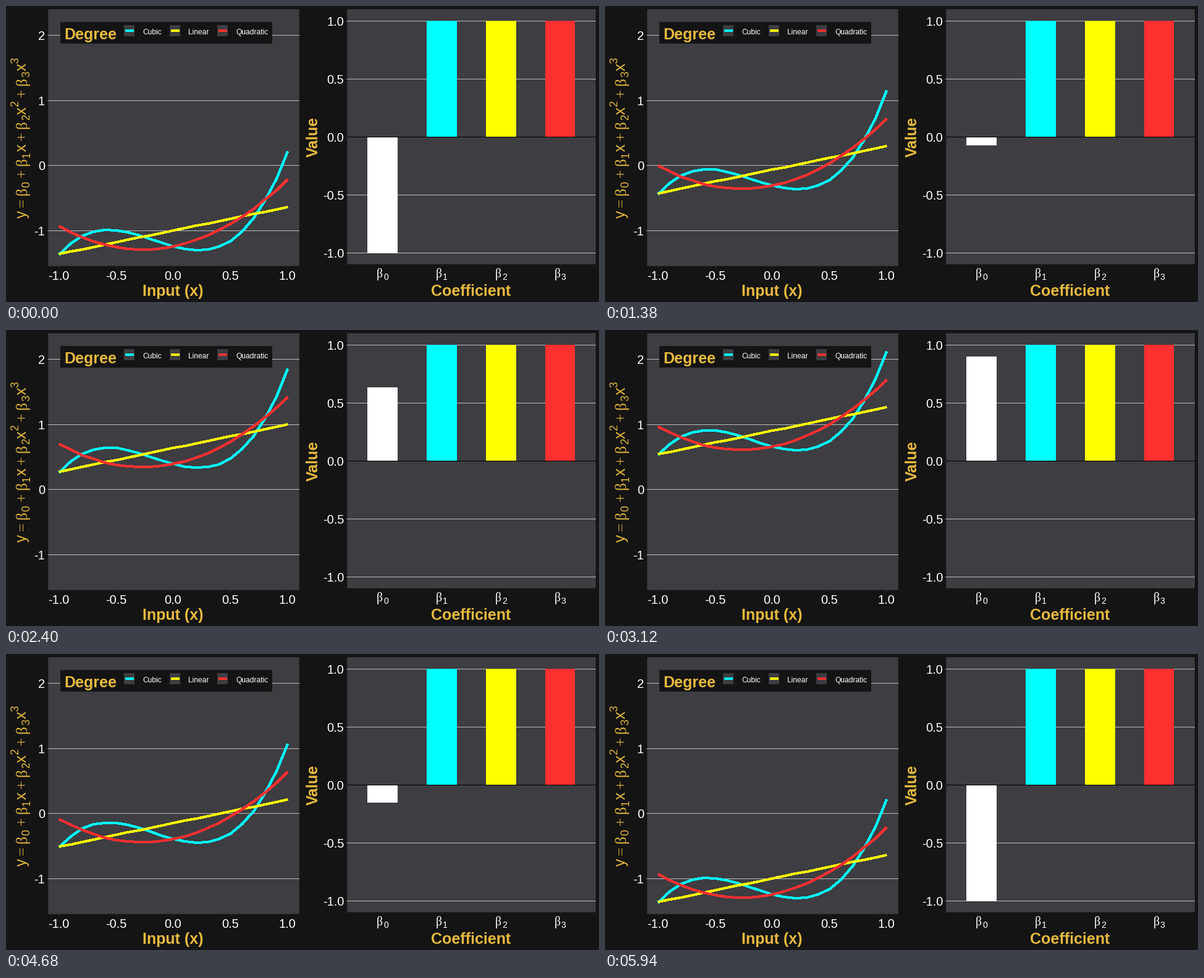
Animation, 960 px wide and 480 px high, one loop 6 s. Source, as a matplotlib script:

```python
import math

import matplotlib.pyplot as plt
import numpy as np
from matplotlib.animation import FuncAnimation
from matplotlib.patches import Rectangle

W, H, DPI = 960, 480, 72  # at 72 dpi one point is one pixel
FRAMES, INTERVAL = 100, 60

BACK, PANEL, GRID, EDGE = "#141414", "#3d3d42", "#bebebe", "#333333"
GOLD, WHITE, CYAN, YELLOW, RED = "#e7b93e", "#ffffff", "#00ffff", "#ffff00", "#ff3030"
SANS, SERIF = "Liberation Sans", "Liberation Serif"

# Pixel position of zero and pixels per unit
X0, X_UNIT = 271.2, 184.8
Y0, Y_UNIT = 258.4, 105.65
BAR0, BAR_UNIT = 212.1, 188

fig = plt.figure(figsize=(W / DPI, H / DPI), dpi=DPI, facecolor=BACK)
ax = fig.add_axes([0, 0, 1, 1])
ax.set_xlim(0, W)
ax.set_ylim(H, 0)
ax.axis("off")


def box(left, top, right, bottom, color, z=1):
    patch = Rectangle((left, top), right - left, bottom - top,
                      facecolor=color, linewidth=0, zorder=z)
    return ax.add_patch(patch)


def label(x, y, text, size, color=WHITE, ha="left", font=SANS, bold=False, angle=0):
    ax.text(x, y, text, fontsize=size, color=color, ha=ha, va="baseline",
            family=font, weight="bold" if bold else "normal",
            rotation=angle, rotation_mode="anchor", zorder=8)


def title(x, y, text, angle=0, ha="center"):
    label(x, y, text, 25, GOLD, ha, bold=True, angle=angle)


def snap(v):
    return math.floor(v + 0.5)


def panel(left, top, right, bottom):
    box(left, top, right, bottom, EDGE)
    box(left + 1, top + 1, right - 1, bottom - 1, PANEL)


def y_axis(left, right, zero, unit, values, fmt):
    for v in values:
        y = snap(zero - unit * v)
        box(left, y, right, y + 1, GRID, 2)
        box(left - 3, y, left, y + 1, EDGE)
        label(left - 5, y + 8, fmt.format(v), 20, ha="right")


def x_tick(x, top):
    box(snap(x), top, snap(x) + 1, top + 3, EDGE)


def formula_label(x, y):
    """Vertical axis title, written upwards from y."""
    gap = 5.4
    serif = (25, 13.7, 0, SERIF)
    sans = (25, 12.5, 0, SANS)
    sub = (17.5, 9.7, 5.5, SANS)
    sup = (17.5, 9.7, -12.5, SANS)

    parts = [("y", sans), (" ", None), ("=", serif), (" ", None)]
    for k in range(4):
        if k:
            parts += [(" ", None), ("+", serif), (" ", None)]
        parts += [("β", serif), (str(k), sub)]
        if k:
            parts.append(("x", sans))
        if k > 1:
            parts.append((str(k), sup))

    for text, style in parts:
        if style is None:
            y -= gap
            continue
        size, advance, shift, font = style
        label(x + shift, y, text, size, GOLD, font=font, angle=90)
        y -= advance


def offset_values():
    """Intercept per frame: 0.1 steps up to 1, then the same way back."""
    keys = [math.floor(2.45 * k + 0.51) for k in range(21)]
    rise = np.interp(np.arange(FRAMES // 2), keys, np.linspace(-1, 1, 21))
    return np.concatenate([rise, rise[::-1]])


def fitted_curves():
    """Sums of orthonormal polynomials of degree 1, 2 and 3."""
    x = np.linspace(-1, 1, 21)
    basis = []
    for degree in (1, 2, 3):
        p = x ** degree
        p = p - p.mean()
        for q in basis:
            p = p - (p @ q) * q
        basis.append(p / np.sqrt(p @ p))
    return x, np.cumsum(basis, axis=0)


# Left panel
panel(68, 5, 475, 422)
y_axis(68, 475, Y0, Y_UNIT, (-1, 0, 1, 2), "{:d}")
for v in (-1, -0.5, 0, 0.5, 1):
    px = X0 + X_UNIT * v
    x_tick(px, 422)
    label(px - 0.7, 444, f"{v:.1f}", 20, ha="center")
title(270.5, 470, "Input (x)")
formula_label(33, 344.2)

# Legend
box(88, 26, 431, 61, BACK, 6)
title(94, 54, "Degree", ha="left")
for text_x, name, color in ((221, "Cubic", CYAN), (295, "Linear", YELLOW),
                            (372, "Quadratic", RED)):
    left = text_x - 30
    box(left, 31, left + 17, 49, PANEL, 7)
    box(left + 2, 38, left + 16, 42, color, 7.5)
    label(text_x, 46, name, 12)

# Right panel
panel(552, 5, 955, 419)
y_axis(552, 955, BAR0, BAR_UNIT, (-1, -0.5, 0, 0.5, 1), "{:.1f}")
for k in range(4):
    px = 609.6 + 95.9 * k
    x_tick(px, 419)
    label(px - 9.4, 440, "β", 20, font=SERIF)
    label(px + 1.6, 444, str(k), 14)
for left, right, color in ((681, 730, CYAN), (777, 826, YELLOW), (873, 921, RED)):
    box(left, 24, right, 213, color, 3)
box(552, 212, 955, 213, "black", 5)
title(752.5, 470, "Coefficient")
title(505, 212, "Value", angle=90)

# Moving parts
offsets = offset_values()
xs, (linear, quadratic, cubic) = fitted_curves()
px_x = np.round(X0 + X_UNIT * xs)
curves = []
for shape, color in ((cubic, CYAN), (linear, YELLOW), (quadratic, RED)):
    # without antialiasing every touched pixel is filled, so 3 shows as 4
    line, = ax.plot([], [], color=color, linewidth=3, antialiased=False,
                    solid_capstyle="butt", solid_joinstyle="round", zorder=4)
    curves.append((line, shape))
white_bar = box(585, 212, 634, 213, WHITE, 3)


def update(i):
    b0 = offsets[i]
    for line, shape in curves:
        line.set_data(px_x, np.round(Y0 - Y_UNIT * (b0 + shape)))
    end = snap(BAR0 - BAR_UNIT * b0)
    top, bottom = min(end, 212), max(end, 212) + 1
    white_bar.set_y(top)
    white_bar.set_height(bottom - top)
    return [line for line, _ in curves] + [white_bar]


anim = FuncAnimation(fig, update, frames=FRAMES, interval=INTERVAL,
                     repeat=True, repeat_delay=0)
plt.show()
```
